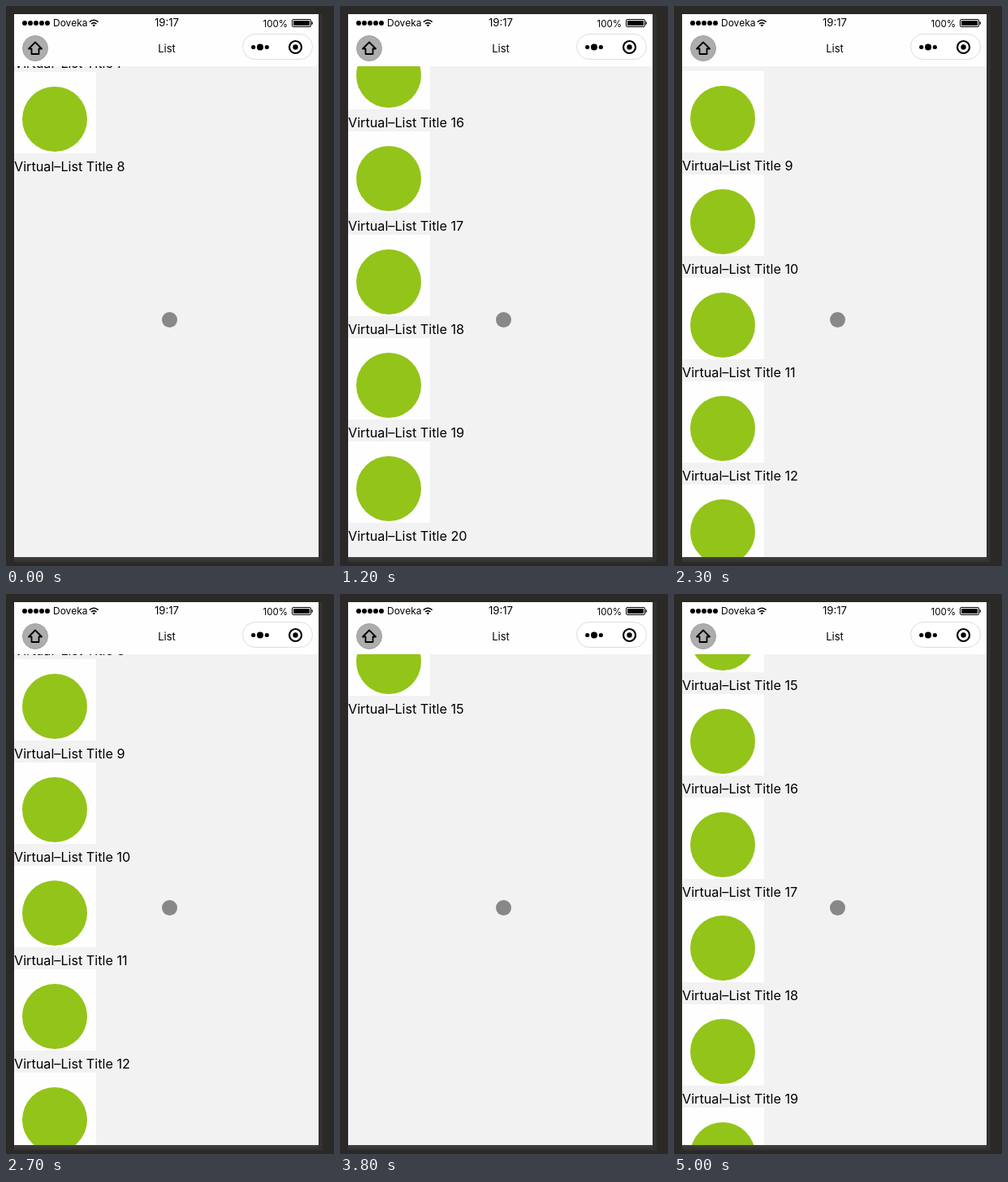
Animation, 404 px wide and 688 px high, one loop 5.1 s. Source, as an HTML page:

```html
<!DOCTYPE html>
<html lang="en">
<head>
<meta charset="utf-8">
<title>Virtual list</title>
<style>
  html, body { margin: 0; width: 100%; height: 100%; overflow: hidden; background: #2a2927; }
  svg { display: block; font-family: Inter, sans-serif; }
</style>
</head>
<body>
<svg width="404" height="688" viewBox="0 0 404 688">
  <defs>
    <clipPath id="view"><rect x="10" y="74" width="375" height="603"/></clipPath>
    <linearGradient id="edge" x2="0" y2="1">
      <stop stop-color="#42413f"/><stop offset="1" stop-color="#2f2e2c"/>
    </linearGradient>
  </defs>
  <rect width="404" height="688" fill="#2a2927"/>
  <rect x="385" y="10" width="5" height="674" fill="#32312f"/>
  <rect x="10" y="677" width="375" height="7" fill="url(#edge)"/>
  <rect x="10" y="10" width="375" height="667" fill="#f2f2f2"/>
  <g id="list" clip-path="url(#view)" font-size="16.2"></g>

  <rect x="10" y="10" width="375" height="64" fill="#fefefe"/>
  <path d="M23 21h28.1" stroke="#000" stroke-width="6" stroke-linecap="round" stroke-dasharray="0 7"/>
  <text x="58" y="25" font-size="12">Doveka</text>
  <g fill="none" stroke="#000" stroke-width="1.5">
    <path d="M102.8 19.6q5.4-4.6 10.8 0M104.9 22q3.3-2.8 6.6 0"/>
    <path d="M106.4 23.4q1.8-1.4 3.6 0l-1.8 2.2z" fill="#000" stroke="none"/>
  </g>
  <text x="198" y="25" font-size="13.2" text-anchor="middle">19:17</text>
  <text x="347" y="26" font-size="11.5" text-anchor="end">100%</text>
  <rect x="352.5" y="16.5" width="23" height="9" rx="1.5" fill="none" stroke="#000"/>
  <path d="M354 18h20v6h-20zM376.5 19q1.5 0 1.5 2t-1.5 2z"/>

  <circle cx="36" cy="52" r="15.5" fill="#adadad" stroke="#a0a0a0"/>
  <path d="M36 44.5l-8 8h3.5v6.5h9v-6.5h3.5z" fill="none" stroke="#000" stroke-width="1.8" stroke-linejoin="round"/>
  <text x="198" y="57" font-size="13" text-anchor="middle">List</text>
  <rect x="291.5" y="34.5" width="86" height="31" rx="15.5" fill="#fff" stroke="#dedede"/>
  <circle cx="304.7" cy="50.5" r="2.6"/>
  <circle cx="313" cy="50.5" r="4"/>
  <circle cx="321.3" cy="50.5" r="2.6"/>
  <circle cx="356.5" cy="50.5" r="7.5" fill="none" stroke="#000" stroke-width="2.2"/>
  <circle cx="356.5" cy="50.5" r="3.2"/>

  <circle cx="201.5" cy="385.5" r="9.5" fill="#888"/>
</svg>
<script>
const LOOP = 5100, STEP = 100, ROW = 127, TOP = 74, BOTTOM = 677;
const RENDER_LAG = 400; // rows appear this long after they scroll into view

// [time, scroll offset]
const keys = [
  [-400, 420], [0, 935], [400, 1430], [800, 1892], [1200, 2005], [1500, 2010],
  [1600, 1904], [1900, 1110], [2300, 1063], [3200, 1063], [3300, 1141],
  [3800, 1880], [4200, 1904], [5000, 1909], [5100, 1909]
];

const slope = i => (keys[i + 1][1] - keys[i][1]) / (keys[i + 1][0] - keys[i][0]);

// Tangent that never overshoots: zero at turns, harmonic mean elsewhere
function tangent(i) {
  if (i === 0) return slope(0);
  if (i === keys.length - 1) return 0;
  const a = slope(i - 1), b = slope(i);
  return a * b > 0 ? 2 * a * b / (a + b) : 0;
}

function scrollAt(t) {
  let i = 0;
  while (i < keys.length - 2 && t >= keys[i + 1][0]) i++;
  const [t0, y0] = keys[i], [t1, y1] = keys[i + 1];
  const d = t1 - t0, u = (t - t0) / d, v = 1 - u;
  return Math.round(v * v * (1 + 2 * u) * y0 + u * u * (3 - 2 * u) * y1
    + d * u * v * (v * tangent(i) - u * tangent(i + 1)));
}

const row = (n, y) => `<g transform="translate(10 ${y})">
  <rect width="101" height="100" fill="#fefefe"/>
  <circle cx="50" cy="58" r="40" fill="#93c41a"/>
  <text y="122">Virtual–List Title ${n}</text></g>`;

const list = document.getElementById("list");
let shown = -1;

function draw(now) {
  const t = Math.floor(now % LOOP / STEP) * STEP;
  if (t !== shown) {
    shown = t;
    const offset = scrollAt(t), rendered = scrollAt(t - RENDER_LAG);
    const first = Math.floor((rendered + TOP) / ROW);
    const last = Math.floor((rendered + BOTTOM) / ROW);
    let rows = "";
    for (let n = first; n <= last; n++) rows += row(n, n * ROW - offset);
    list.innerHTML = rows;
  }
  requestAnimationFrame(draw);
}
draw(performance.now());
</script>
</body>
</html>
```
